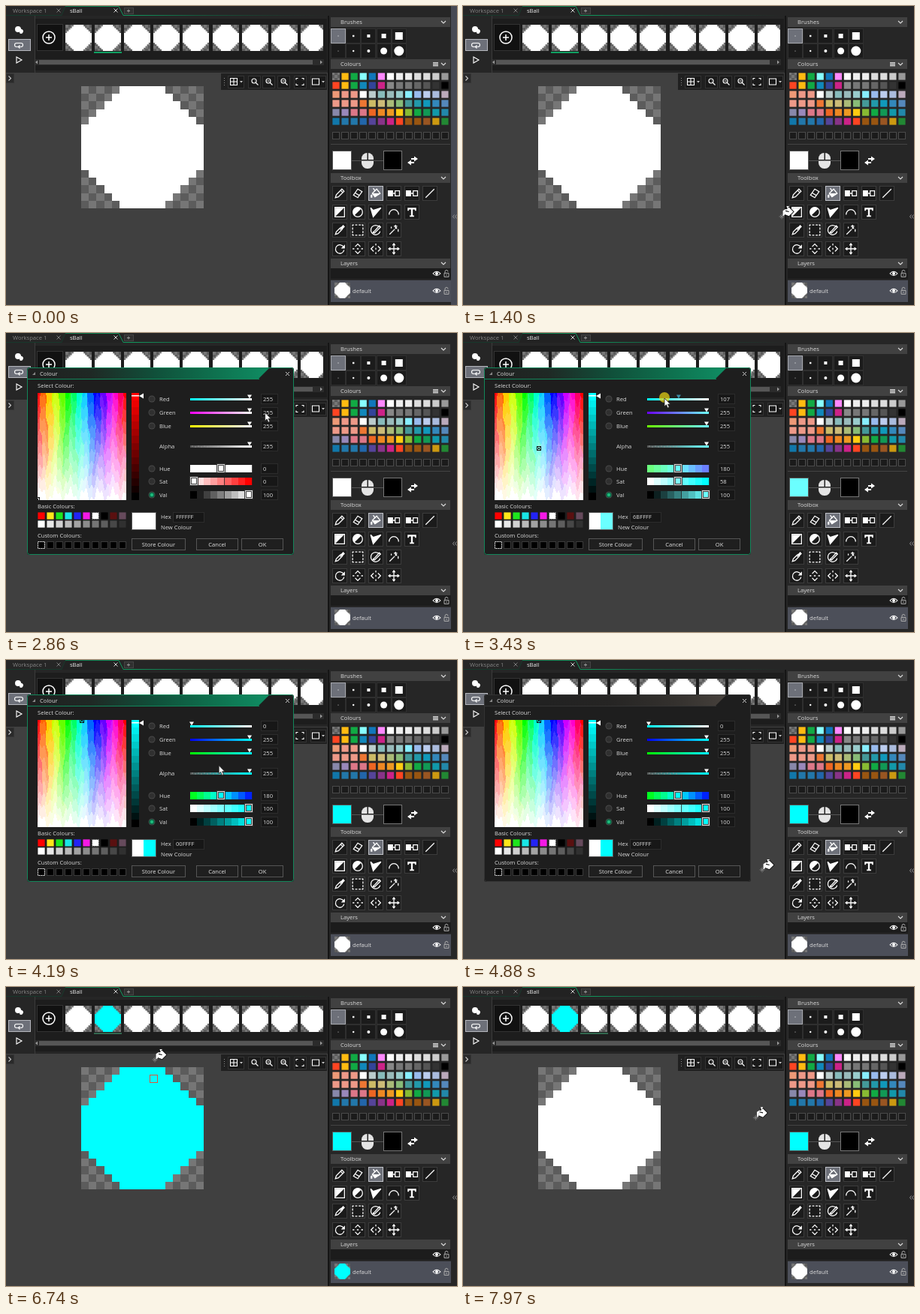
These frames come from a looping animation (600x399 px, 8000 ms). An HTML page with a canvas:

```html
<!DOCTYPE html>
<html lang="en">
<head>
<meta charset="utf-8">
<title>Sprite editor</title>
<style>
html, body { margin: 0; width: 100%; height: 100%; overflow: hidden; background: #262626; }
canvas { display: block; width: 600px; height: 399px; }
</style>
</head>
<body>
<canvas id="stage" width="600" height="399"></canvas>
<script>
const stage = document.getElementById('stage');
const g = stage.getContext('2d');
const LOOP = 8000, TICK = 70;
const FONT = '7.6px "Open Sans", "Noto Sans", sans-serif';
const WHITE = '#fff', INK = '#1b1b1b', LIT = '#6d7079', CYAN = '#00ffff';

// Basic drawing
function box(x, y, w, h, c) { g.fillStyle = c; g.fillRect(x, y, w, h); }
function frame(x, y, w, h, c) { g.strokeStyle = c; g.lineWidth = 1; g.strokeRect(x + .5, y + .5, w - 1, h - 1); }
function tile(x, y, w, h, fill, edge) { box(x, y, w, h, fill); frame(x, y, w, h, edge); }
function chip(x, y, c) { box(x + .4, y + .4, 9.2, 9.2, c); }
function text(s, x, y, c = '#dcdcdc', align = 'left') {
  g.font = FONT; g.fillStyle = c; g.textAlign = align; g.fillText(s, x, y + 2.7);
}
function stroke(d, x, y, c = WHITE, w = 1.1, scale = 1) {
  g.save(); g.translate(x, y); g.scale(scale, scale);
  g.strokeStyle = c; g.lineWidth = w; g.stroke(new Path2D(d)); g.restore();
}
function shape(d, x, y, c = WHITE, scale = 1) {
  g.save(); g.translate(x, y); g.scale(scale, scale);
  g.fillStyle = c; g.fill(new Path2D(d)); g.restore();
}
function cross(x, y, c) { stroke('M-2.5-2.5l5 5M2.5-2.5l-5 5', x, y, c, 1); }
function dot(x, y, r, c) { g.fillStyle = c; g.beginPath(); g.arc(x, y, r, 0, 7); g.fill(); }
function gradient(x, w, stops) {
  const gr = g.createLinearGradient(x, 0, x + w, 0);
  stops.forEach((c, i) => gr.addColorStop(i / (stops.length - 1), c));
  return gr;
}
function ramp(x, y, w, h, ...stops) { box(x, y, w, h, gradient(x, w, stops)); }
const rgb = (...v) => `rgb(${v.map(Math.round)})`;
const clamp = (v, a, b) => Math.min(b, Math.max(a, v));
function hsv(h, s, v) {
  const f = n => { const k = (n + h / 60 + 12) % 6; return 255 * v * (1 - s * clamp(Math.min(k, 4 - k), 0, 1)); };
  return rgb(f(5), f(3), f(1));
}
function checker(x, y, w, n) {
  box(x, y, w, w, '#5c5c5c');
  const edge = i => Math.round(i * w / n);
  for (let r = 0; r < n; r++) for (let c = r % 2; c < n; c += 2)
    box(x + edge(c), y + edge(r), edge(c + 1) - edge(c), edge(r + 1) - edge(r), '#767676');
}
// Stepped octagon on a 16 by 16 grid
function ball(x, y, w, c, checks) {
  checker(x, y, w, checks);
  const edge = i => w > 60 ? Math.round(i * w / 16) : i * w / 16;
  const left = [], right = [];
  for (let r = 0; r < 16; r++) {
    const inset = Math.max(0, 5 - Math.min(r, 15 - r));
    for (const row of [r, r + 1]) {
      left.unshift([x + edge(inset), y + edge(row)]);
      right.push([x + edge(16 - inset), y + edge(row)]);
    }
  }
  g.fillStyle = c; g.beginPath();
  right.concat(left).forEach(p => g.lineTo(...p));
  g.fill();
}

// Each icon: stroked path | filled path
const icons = {
  pencil: 'M-5 5l1-3.5 6.5-6.5 2.5 2.5-6.5 6.5zM1-3.5l2.5 2.5|',
  eraser: 'M-5 2l5-7 5 3-5 7zM-3-.5l5 3|',
  fill: 'M-4 0l5-5 4 5-6 4zM-1-3l-2-3|M-4 0h9l-6 4zM-6 2l2-1v4h-2z',
  swap: 'M1.5-3h5v6h-5zM-1 0h3|M-7-3.5h6v7h-6z',
  line: 'M-5 5L5-5|',
  rect: 'M-5.5-5.5h11v11h-11z|M-5 5V-5H5z',
  oval: 'M5.5 0a5.5 5.5 0 1 1-11 0a5.5 5.5 0 1 1 11 0z|M-4 4A5.5 5.5 0 0 1 4-4z',
  poly: 'M-6-5l3 10.5 9-10.5M-6-5l3 3 9-3|M-6-5l3 3 9-3-9 10.5z',
  arc: 'M-5.5 3a5.5 6 0 0 1 11 0|',
  type: '|M-5-5h10v3.5h-1.3l-.5-1.5h-2.2v7h1.5v1.5h-5v-1.5h1.5v-7h-2.2l-.5 1.5h-1.3z',
  pick: 'M-5 5l1-3 4-4 2 2-4 4z|M0-3l2-1 2-2 2 2-2 2-1 2z',
  select: 'M-3-6h2.5M1-6h2.5M-3 6h2.5M1 6h2.5M-6-3v2.5M-6 1v2.5M6-3v2.5M6 1v2.5M-6-4.5v-1.5h1.5M4.5-6h1.5v1.5M-6 4.5v1.5h1.5M4.5 6h1.5v-1.5|',
  brush: 'M4-3.5a5.5 5.5 0 1 0 1 5M-3 3l7-8 1.5 1.5-7 7z|M-4 4l1-3 2 2z',
  wand: 'M-5 5l6-6M2-6v3M0-4.5h4M5-1v3M-3-4v2|M1-2.5l1.5-1.5 1.5 1.5-1.5 1.5z',
  turn: 'M4.5-2a5 5 0 1 0 .5 3.5|M6-5v4.5h-4.5z',
  flipV: 'M-6 0h2M-1 0h2M4 0h2M-3-2.5l3-3 3 3M-3 2.5l3 3 3-3|',
  flipH: 'M0-6v2M0-1v2M0 4v2M-2.5-3l-3 3 3 3M2.5-3l3 3-3 3|',
  move: 'M-5 0h10M0-5v10M-1.5-4l1.5-2 1.5 2M-1.5 4l1.5 2 1.5-2M-4-1.5l-2 1.5 2 1.5M4-1.5l2 1.5-2 1.5|',
  plus: 'M8 0a8 8 0 1 1-16 0a8 8 0 1 1 16 0M-4 0h8M0-4v8|',
  zoom: 'M2-1a3 3 0 1 1-6 0a3 3 0 1 1 6 0M1.5 1.5l3 3|',
  grid: 'M-4.5-4.5h9v9h-9zM0-4.5v9M-4.5 0h9|',
  fit: 'M-5-2.5v-2h2.5M5-2.5v-2h-2.5M-5 2.5v2h2.5M5 2.5v2h-2.5|',
  square: 'M-4.5-4h9v8h-9z|',
  loop: 'M2 2h1a2.5 2.5 0 0 0 0-5h-6a2.5 2.5 0 0 0 0 5h2|M1.5-.8l-3 2.8 3 2.8z',
  eye: 'M-5 0q5-5.500 10 0q-5 5.500-10 0z|M2 0a2 2 0 1 1-4 0a2 2 0 1 1 4 0',
  lock: 'M-3-.5h6v5h-6zM-2-.5v-2a2 2 0 0 1 4 0M0 1v2|',
  onion: '|M-1-5a4 4 0 0 1 0 8a4 4 0 0 1 0-8M2-1a3 3 0 1 1-1 5z'
};
function icon(name, x, y, c = WHITE, w = 1.1, scale = 1) {
  const [s, f] = icons[name].split('|');
  if (s) stroke(s, x, y, c, w, scale);
  if (f) shape(f, x, y, c, scale);
}

const palette = [
  '888 fb1 1a4 8ff 17b f8f fff eee eee ddd ddd ccc 999',
  'f42 fb1 1a4 18b 349 c28 888 777 777 666 555 333 000',
  'e97 e98 e98 fff bcc 8bb 9bb 9cc 8ef 9be bce abd bab',
  'e98 e98 e98 e73 cb6 cb7 ab7 8b7 499 29a 19b 38b 58b',
  '88a 98b d78 d78 e62 e82 e92 fc1 8b3 1a4 195 19a 28a',
  '17a 27a 27a 26a 549 838 c28 f42 951 951 952 c91 283'
].map(r => r.split(' '));
const tools = [
  ['pencil', 'eraser', 'fill', 'swap', 'swap', 'line'],
  ['rect', 'oval', 'poly', 'arc', 'type'],
  ['pick', 'select', 'brush', 'wand'],
  ['turn', 'flipV', 'flipH', 'move']
];

function header(label, y) {
  box(432, y, 159, 13, '#414141');
  text(label, 445, y + 6.5);
  stroke('M-3-1.5l3 3 3-3', 582, y + 6.5, '#ddd');
}

function sidePanel(s) {
  box(428, 13, 164, 386, '#262626');
  box(428, 13, 2, 386, '#151515');
  header('Brushes', 15);
  for (let i = 0; i < 10; i++) {
    const col = i % 5, row = Math.floor(i / 5), x = 442 + col * 20.2, y = 40 + row * 20;
    tile(Math.round(x - 10), y - 10, 20, 20, i ? INK : LIT, i ? '#2f2f2f' : '#a5a7ad');
    const r = [.5, 1.2, 2, 3, 5][col] + (row && col > 2 ? 1.5 : 0);
    if (row) dot(x, y, r, WHITE); else box(x - r, y - r, 2 * r, 2 * r, WHITE);
  }
  header('Colours', 71);
  for (let i = 0; i < 3; i++) box(568, 75 + i * 2, 7, 1.3, '#ddd');
  palette.forEach((row, r) => row.forEach((c, i) => {
    const x = 434 + i * 12.08, y = 89 + r * 12;
    if (r || i) chip(x, y, '#' + c); else checker(x, y, 10, 3);
  }));
  for (let i = 0; i < 13; i++) tile(Math.round(434 + i * 12.08), 168, 10, 10, INK, '#4a4a4a');
  box(432, 184, 159, 1, '#444');
  box(460, 206, 42, 1, '#555');
  tile(434, 193, 26, 26, s.colour, '#555');
  tile(502, 193, 25, 26, '#000', '#777');
  g.fillStyle = '#e4e4e4'; g.beginPath(); g.roundRect(473, 196, 16, 21, 7.5); g.fill();
  box(473, 205, 16, 1.5, '#222'); box(480.5, 196, 1.5, 9, '#222');
  // Swap arrows
  shape('M-1 1v-2h4v-2.500l5 3.500-5 3.500v-2.500z', 540, 204);
  shape('M1-1v2h-4v2.500l-5-3.500 5-3.500v2.500z', 542, 209, '#222', 1.15);
  shape('M1-1v2h-4v2.500l-5-3.500 5-3.500v2.500z', 542, 209);
  header('Toolbox', 223);
  tools.forEach((row, r) => row.forEach((name, i) => {
    const x = Math.round(444 + i * 24), y = Math.round(250 + r * 24.6), on = name === 'fill';
    tile(x - 10, y - 10, 20, 20, on ? LIT : INK, on ? '#c0c2c8' : '#3c3c3c');
    icon(name, x, y, WHITE, 1.1, 1.15);
  }));
  header('Layers', 337);
  box(432, 350, 160, 14, '#1c1c1c');
  box(432, 366, 160, 29, '#4c4f59');
  ball(437, 369, 21, s.canvas, 6);
  text('default', 461, 380);
  for (const y of [357, 380]) { icon('eye', 573, y); icon('lock', 586, y, '#aaa', 1); }
  box(592, 0, 8, 399, s.t < 260 ? '#474a54' : '#262626');
  stroke('M-.5-2.5l-2 2.500 2 2.500M2.500-2.500l-2 2.500 2 2.500', 597, 281, '#999', .9);
}

function tabs() {
  box(0, 0, 592, 13, '#262626');
  text('Workspace 1', 9, 6, '#858585');
  cross(70, 6, '#777');
  shape('M74 13L80 0H150L156 13z', 0, 0, '#222');
  stroke('M0 12.5H74L79 .5', 0, 0, '#17382b', 1);
  stroke('M79 .5H150L156 12.5H428', 0, 0, gradient(79, 349, ['#0f6f48', '#119a5f', '#145a3e', '#1c3a2e', '#262626']), 1);
  text('sBall', 85, 6, '#eee');
  cross(146, 6, '#ccc');
  tile(157, 2, 13, 9, '#303030', '#444');
  stroke('M-2 0h4M0-2v4', 163, 6.5, '#999', 1);
}

function filmstrip(s) {
  const left = i => Math.round(79 + i * 39.1);
  box(0, 13, 428, 76, '#262626');
  box(38, 13, 1, 76, '#3c3c3c');
  box(39, 17, 388, 69, '#1d1d1d');
  icon('onion', 17, 32);
  tile(3, 44, 30, 16, LIT, '#b5b7bd');
  icon('loop', 17, 52.5);
  stroke('M-3-4l7 4-7 4z', 17, 72);
  tile(41, 24, 35, 36, '#111', '#333');
  icon('plus', 57, 42, WHITE, 1.5);
  g.save(); g.beginPath(); g.rect(39, 13, 383, 76); g.clip();
  for (let i = 0; i < 9; i++) ball(left(i), 25, 35, i === 1 && s.filled ? CYAN : WHITE, 10);
  box(left(s.frame) - 1, 61, 37, 2, s.dim ? '#32684f' : '#10a062');
  g.restore();
  box(39, 71, 384, 8, '#2b2b2b');
  box(44, 72, 364, 6, s.scroll ? '#777' : '#565656');
  shape('M-2 0l3-2.5v5z', 41, 75, '#999');
  shape('M2 0l-3-2.5v5z', 419, 75, '#999');
}

function workspace(s) {
  box(0, 89, 428, 310, '#404040');
  box(0, 88, 428, 1, '#171717');
  tile(0, 90, 11, 13, '#2a2a2a', '#353535');
  stroke('M-1.5-3l3 3-3 3', 5, 96.5, '#ccc');
  ball(100, 107, 163, s.canvas, 16);
  // The hovered cell keeps its outline briefly after the pointer leaves
  let cell = null;
  if (s.bucket && s.x >= 100 && s.x < 263 && s.y >= 107 && s.y < 270) cell = [s.x, s.y];
  else if (s.t > 6600 && s.t < 6900) cell = [195, 120];
  if (cell) {
    const snap = (v, o) => o + Math.floor(Math.floor((v - o) / 10.19) * 10.19);
    frame(snap(cell[0], 100), snap(cell[1], 107), 11, 11, '#e0543c');
  }
  box(286, 90, 141, 22, '#202020');
  for (let i = 0; i < 4; i++) box(290, 96 + i * 3, 1, 1, '#888');
  for (const [x, w] of [[295, 22], [322, 17], [341, 17], [361, 17], [383, 17], [405, 21]])
    tile(x, 93, w, 17, '#1a1a1a', '#333');
  icon('grid', 303, 101);
  [331, 350, 370].forEach((x, i) => {
    icon('zoom', x, 101);
    stroke(i ? 'M-1.5 0h3' : 'M0 0h.5', x - 1, 100, WHITE, 1);
  });
  icon('fit', 391, 101);
  icon('square', 412, 101);
  for (const x of [313, 422]) shape('M-2-1h4l-2 2.5z', x, 101, '#ccc');
}

// Hue across, saturation upwards, in ragged bands
const field = document.createElement('canvas');
field.width = 118; field.height = 143;
{
  const f = field.getContext('2d');
  for (let y = 0; y < 143; y++) for (let x = 0; x < 118; x++) {
    const wave = (Math.sin(y * .05 + x * .11) * 2.5 + Math.sin(y * .16 + x * .3)) * (.4 + y / 143);
    const hue = clamp(Math.round((x + wave) / 118 * 15) / 15 * 360, 0, 360);
    const sat = 1 - (y + Math.sin(x * .33) * 7 + Math.sin(x * .9) * 4) / 143;
    f.fillStyle = hsv(hue, clamp(Math.round(sat * 9) / 9, 0, 1), 1);
    f.fillRect(x, y, 1, 1);
  }
}

function valueBox(v, y) { tile(339, y - 7, 23, 14, '#171717', '#2c2c2c'); text(v, 342, y); }
function slider(label, y, value, from, to, markX, markColour = WHITE) {
  text(label, 204, y);
  ramp(245, y - 1, 82, 3, from, to);
  shape('M-3-3h6l-3 5z', markX, y - 2.5, markColour);
  valueBox(value, y);
}
function blocks(label, y, value, at, colour) {
  text(label, 204, y);
  for (let i = 0; i < 9; i++) box(245 + Math.round(i * 9.1), y - 5, 9.2, 10, colour(i));
  const x = 245 + Math.round(at * 9.1);
  frame(x - 1, y - 7, 12, 13, '#333');
  frame(x, y - 6, 10, 11, '#ddd');
  frame(x + 1, y - 5, 8, 9, '#444');
  valueBox(value, y);
}
function button(label, x, w) {
  tile(x, 274, w, 16, '#1f1f1f', '#555');
  text(label, x + w / 2, 282, '#e4e4e4', 'center');
}

function dialog(s) {
  const red = s.red, hue = red < 255 ? 180 : 0, sat = 1 - red / 255;
  const edge = s.dim ? '#333' : '#12865a';
  g.fillStyle = '#1e1e1e'; g.beginPath(); g.roundRect(28, 46, 355, 250, 3); g.fill();
  ramp(29, 47, 338, 14, ...(s.dim
    ? ['#222', '#222', '#262524', '#34312e', '#4a443f']
    : ['#202020', '#1f2925', '#10503a', '#0e7350', '#109468']));
  shape('M336 61l14-14h32v14z', 0, 0, '#1e1e1e');
  g.strokeStyle = edge; g.lineWidth = 1;
  g.beginPath(); g.roundRect(28.5, 46.5, 354, 249, 3); g.stroke();
  box(29, 61, 308, 1, edge);
  shape('M-2 2h4v-4z', 37, 54, '#888');
  text('Colour', 45, 54);
  cross(374.5, 54.5, '#ccc');
  text('Select Colour:', 42, 70.5);
  g.drawImage(field, 42, 80);
  const px = 42 + 118 * hue / 360, py = 222 - 141 * (1 - s.lagRed / 255);
  g.save(); g.beginPath(); g.rect(42, 80, 118, 143); g.clip();
  frame(Math.round(px) - 3, Math.round(py) - 3, 6, 6, '#111');
  stroke('M-1.5-1.5l3 3M1.5-1.5l-3 3', px, py, '#111', 1);
  g.restore();
  for (let i = 0; i < 15; i++) box(167, 80 + Math.round(i * 9.53), 10, 10, hsv(hue, 1, 1 - i / 14));
  box(167, 83, 10, 1.5, WHITE);
  shape('M-3 0l6-3.5v7z', 180, 84);

  [88, 106, 124, 181, 198, 216].forEach((y, i) => {
    dot(194, y, 4.5, '#4a4a4a'); dot(194, y, 3.6, '#303030');
    if (i === 5) { dot(194, y, 3.6, '#0c6f4a'); dot(194, y, 2, '#20c080'); }
  });
  const moving = s.lagRed !== red;
  slider('Red', 88, Math.round(red), CYAN, WHITE, 247 + 77 * s.lagRed / 255, moving ? '#3c8ca6' : WHITE);
  slider('Green', 106, 255, rgb(red, 0, 255), s.colour, 324);
  slider('Blue', 124, 255, rgb(red, 255, 0), s.colour, 324);
  slider('Alpha', 151, 255, '#555', s.colour, 324);
  for (let i = 0; i < 10; i++) box(247 + i * 4, 150 + i % 2, 2, 2, 'rgba(150,150,150,.4)');
  blocks('Hue', 181, hue, 4, i => hsv(hue + (i - 4) * 13 + 360, sat, 1));
  blocks('Sat', 198, Math.round(sat * 100), Math.floor(sat * 8), i => hsv(hue, i / 8, 1));
  blocks('Val', 216, 100, 8, i => hsv(hue, sat, i / 8));

  text('Basic Colours:', 42, 231.5);
  '#f00 #ffe619 #1ee61e #19e6e6 #2323f5 #f519e6 #fff #000 #5a1010 #664a5c'.split(' ').forEach((c, i) => {
    const x = 42 + i * 12, v = 255 - i * 23;
    chip(x, 239, c);
    chip(x, 250, rgb(v, v, v));
    tile(x, 278, 10, 10, '#000', '#3a3a3a');
  });
  g.setLineDash([2, 1]);
  frame(114, 239, 10, 10, '#444');
  frame(42, 278, 10, 10, '#ddd');
  g.setLineDash([]);
  box(167, 239, 17, 24, WHITE);
  box(183, 239, 17, 24, s.colour);
  frame(167, 239, 33, 24, '#555');
  text('Hex', 206, 245.5);
  tile(222, 239, 42, 14, '#171717', '#2c2c2c');
  text(Math.round(red).toString(16).toUpperCase().padStart(2, '0') + 'FFFF', 226, 245.5);
  text('New Colour', 206, 259.5);
  text('Custom Colours:', 42, 270.5);
  button('Store Colour', 167, 72);
  button('Cancel', 253, 56);
  button('OK', 313, 56);
}

function pointer(s) {
  if (s.press) dot(s.x, s.y - 1, 7, 'rgba(225,205,20,.75)');
  if (s.bucket) {
    stroke('M-3.5 0h7M0-3.5v7M-2-2l4 4M2-2l-4 4', s.x, s.y, '#858585', .8);
    const x = s.x + 8.5, y = s.y - 6.5, body = 'M-4-1l5-4 5 5-5 5-5-2z';
    stroke(body, x, y, '#111', 1.6, 1.15);
    shape(body, x, y, WHITE, 1.15);
    shape('M-6-1l3-2 2 1-3 2v4l-2 1z', x, y, WHITE, 1.15);
    stroke('M-3-1l4 1M-1-3l-1-3', x, y, '#111', 1, 1.15);
    stroke('M0-3l-1-3 2 0', x, y, WHITE, 1.2, 1.15);
  } else {
    const d = 'M0 0v11l2.5-2.3 1.8 4.3 2-.9-1.8-4h3.3z';
    shape(d, s.x, s.y);
    stroke(d, s.x, s.y, '#222', .8);
  }
}

// Pointer path: time, x, y
const path = [
  [1190, 400, 360], [1610, 448, 202], [2160, 448, 202], [3000, 324, 87], [3150, 324, 87],
  [3220, 312, 87], [3290, 286.9, 87], [3360, 279.3, 87], [3430, 268, 87], [3700, 246, 87],
  [3980, 246, 87], [4810, 393, 299], [4880, 398, 280], [5160, 487, 240], [5650, 347, 185],
  [5720, 293, 205], [5790, 250, 212], [6000, 167, 177], [6530, 167, 177], [6740, 198, 97],
  [7090, 182, 23], [7570, 182, 23], [7970, 419, 196]
];
function at(t) {
  const i = path.findIndex(p => p[0] > t);
  if (i < 0) return path[path.length - 1].slice(1);
  if (i === 0) return path[0].slice(1);
  const [a, b] = [path[i - 1], path[i]], k = (t - a[0]) / (b[0] - a[0]);
  return [a[1] + (b[1] - a[1]) * k, a[2] + (b[2] - a[2]) * k];
}
const within = (t, a, b) => t >= a && t < b;
function redAt(t) {
  if (t < 3150) return 255;
  if (t > 3700) return 0;
  return clamp((at(t)[0] - 247) / 77 * 255, 0, 255);
}

const bursts = [0, 260, 1190, 2230, 3220, 4050, 4880, 5720, 6200, 6600, 7420, 7640];
function tick(t) {
  const start = bursts.filter(b => b <= t).pop();
  return start + Math.floor((t - start) / TICK + 1e-6) * TICK;
}

function draw(now) {
  const t = tick(now % LOOP), [x, y] = at(t);
  const red = redAt(t - TICK), open = within(t, 1820, 5090);
  const filled = t >= 6270, frameNo = t >= 7420 ? 2 : 1;
  const s = {
    t, x, y, red, filled, frame: frameNo,
    lagRed: redAt(t - 2 * TICK),
    colour: rgb(red, 255, 255),
    canvas: filled && frameNo === 1 ? CYAN : WHITE,
    dim: t >= 4740,
    scroll: within(t, 6740, 7000) && y > 66 && y < 84,
    bucket: t >= 1190 && x < 428 && y > 90 && !(open && x < 384 && y < 297),
    press: within(t, 1680, 1820) || within(t, 3220, 3900) || within(t, 6200, 6340) || within(t, 7420, 7490)
  };
  workspace(s);
  filmstrip(s);
  tabs();
  sidePanel(s);
  if (open) dialog(s);
  if (t >= 1190) pointer(s);
}

const begin = performance.now();
function loop() {
  draw(performance.now() - begin);
  requestAnimationFrame(loop);
}
loop();
</script>
</body>
</html>
```
